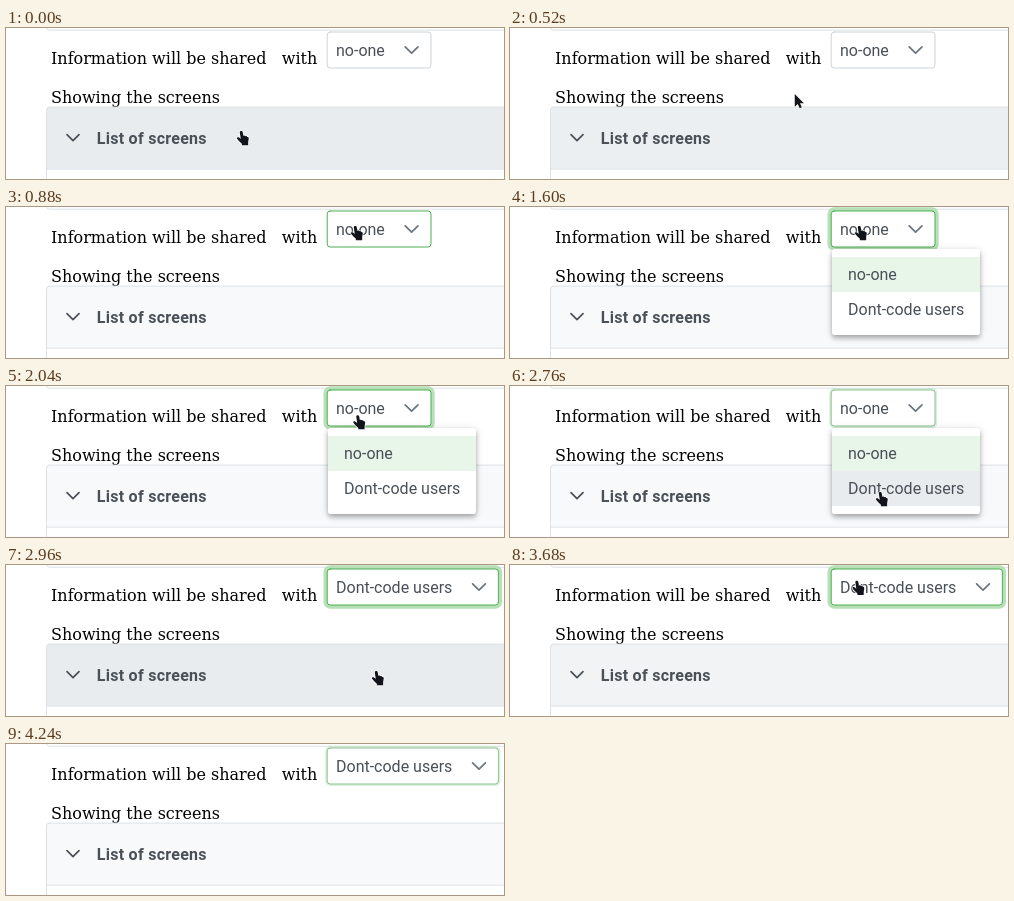
An HTML page with a canvas for the animation above (4.28 s loop, 498x151 px).

```html
<!DOCTYPE html>
<html lang="en">
<head>
<meta charset="utf-8">
<title>Sharing a list</title>
<style>
html, body { margin: 0; width: 100%; height: 100%; overflow: hidden; background: #fff; }
canvas { display: block; width: 498px; height: 151px; }
</style>
</head>
<body>
<canvas id="stage"></canvas>
<script>
const W = 498, H = 151, LOOP = 4280, STEP = 40;
const SERIF = '16px "DejaVu Serif", serif';
const SANS = '16px Roboto, sans-serif';
const BOLD = 'bold 16px Roboto, sans-serif';
const LINE = '#dee2e6', INK = '#495057';
const GREY = [206, 212, 218], GREEN = [76, 175, 80];

const canvas = document.getElementById('stage');
const ratio = window.devicePixelRatio || 1;
canvas.width = Math.round(W * ratio);
canvas.height = Math.round(H * ratio);
const ctx = canvas.getContext('2d');

const clamp = v => Math.min(1, Math.max(0, v));
const ramp = (t, from, to) => clamp((t - from) / (to - from));
const easeOut = u => 1 - (1 - u) ** 3;
const easeInOut = u => u < .5 ? 4 * u ** 3 : 1 - 4 * (1 - u) ** 3;
const lerp = (a, b, u) => a + (b - a) * u;
const mix = (a, b, u) => `rgb(${a.map((v, i) => Math.round(lerp(v, b[i], u))).join(',')})`;

function text(str, x, y, font, color, spacing = 0) {
  ctx.font = font;
  ctx.fillStyle = color;
  ctx.letterSpacing = spacing + 'px';
  ctx.fillText(str, x, y);
}

function roundRect(x, y, w, h, r) {
  ctx.beginPath();
  ctx.roundRect(x, y, w, h, r);
}

function chevron(x, y, size, color, width) {
  ctx.beginPath();
  ctx.moveTo(x - size, y - size / 2);
  ctx.lineTo(x, y + size / 2);
  ctx.lineTo(x + size, y - size / 2);
  ctx.strokeStyle = color;
  ctx.lineWidth = width;
  ctx.lineCap = ctx.lineJoin = 'round';
  ctx.stroke();
}

// Pointer moves: start, end, and the top left corner before and after
const moves = [
  [260, 800, [230, 102], [342, 19]],
  [800, 880, [342, 19], [344, 18]],
  [1880, 2400, [344, 18], [365, 105]],
  [3400, 3880, [365, 105], [332, -22]]
];

function pointerAt(t) {
  let pos = moves[0][2];
  for (const [from, to, a, b] of moves) {
    if (t < from) break;
    const u = easeInOut(ramp(t, from, to));
    pos = a.map((v, i) => lerp(v, b[i], u));
  }
  return pos;
}

const hand = new Path2D('M4 2.6C4 .8 6.8 .6 7.1 2.4L7.8 6.2C8.6 5.6 9.6 5.8 10 6.5' +
  'C10.8 6.2 11.6 6.6 11.9 7.4C13 7.3 13.5 8 13.4 9L12.8 13V16H6.2V14.6' +
  'C4.4 13 2.2 10.8 1 9C.5 7.7 2 7 3.2 8L5 9.4Z');
const arrow = new Path2D('M5 1V14.5L8.2 11.6L10.2 16L12.4 15L10.5 10.8H14.6Z');

function drawPointer(t, [x, y]) {
  const tipX = x + 5, tipY = y + 1;
  const menuOpen = t >= 1400 && t < 2880;
  const onSelect = tipX > 321 && tipY > 3 && tipY < 41;
  const shape = menuOpen || onSelect || tipY > 79 ? hand : arrow;
  ctx.save();
  ctx.translate(x, y);
  ctx.scale(.95, .95);
  ctx.lineJoin = 'round';
  ctx.lineWidth = 1.4;
  ctx.strokeStyle = '#fff';
  ctx.stroke(shape);
  ctx.fillStyle = '#12141c';
  ctx.fill(shape);
  ctx.restore();
}

function drawPage(t) {
  ctx.lineWidth = 1;
  ctx.strokeStyle = LINE;
  ctx.beginPath();
  ctx.moveTo(40.5, -2);
  ctx.arcTo(40.5, 2.2, 44, 2.2, 3);
  ctx.lineTo(W, 2.2);
  ctx.stroke();

  text('Information will be shared\u00a0\u00a0\u00a0with', 45, 36, SERIF, '#000');
  text('Showing the screens', 45, 75, SERIF, '#000');

  const hover = t < 2000 ? 1 - ramp(t, 480, 680)
    : ramp(t, 2800, 2960) - ramp(t, 3580, 3780);
  roundRect(40.5, 79.1, W, 62, [3, 0, 0, 0]);
  ctx.fillStyle = mix([248, 249, 250], [233, 236, 239], hover);
  ctx.fill();
  ctx.strokeStyle = LINE;
  ctx.stroke();
  ctx.beginPath();
  ctx.moveTo(40.5, 141);
  ctx.lineTo(40.5, H);
  ctx.stroke();
  chevron(67, 109.7, 6, INK, 1.7);
  text('List of screens', 90.7, 116, BOLD, INK, .27);
}

// Focus: gained on opening, dropped on pressing an item, regained, lost at the end
function focusAt(t) {
  if (t < 2680) return ramp(t, 1380, 1600);
  if (t < 2780) return 1 - ramp(t, 2680, 2840);
  return lerp(.4, 1, ramp(t, 2780, 2960)) - ramp(t, 4160, 4320);
}

function drawSelect(t) {
  const chosen = t >= 2800;
  const x = 321.2, y = 4, w = chosen ? 171.2 : 103.8, h = 36;
  const focus = focusAt(t);
  if (focus > 0) {
    const spread = .5 + 3.2 * focus;
    ctx.globalAlpha = focus;
    roundRect(x - spread, y - spread, w + 2 * spread, h + 2 * spread, 3 + spread);
    ctx.fillStyle = '#b7e0b8';
    ctx.fill();
    ctx.globalAlpha = 1;
  }
  const hover = ramp(t, 580, 780) - ramp(t, 2500, 2900);
  roundRect(x, y, w, h, 3);
  ctx.fillStyle = '#fff';
  ctx.fill();
  ctx.lineWidth = 1;
  ctx.strokeStyle = mix(GREY, GREEN, Math.max(hover, focus));
  ctx.stroke();
  text(chosen ? 'Dont-code users' : 'no-one', 330, 28, SANS, INK);
  chevron(x + w - 19.4, 22, 6.4, '#6c757d', 1.7);
}

function drawMenu(t, tipY) {
  const open = easeOut(ramp(t, 1380, 1500));
  const alpha = open * (1 - ramp(t, 2780, 2880));
  if (alpha <= 0) return;
  ctx.save();
  ctx.globalAlpha = alpha;
  ctx.translate(0, 42);
  ctx.scale(1, lerp(.8, 1, open));
  ctx.fillStyle = '#fff';
  for (const [dy, blur, a] of [[1, 10, .12], [4, 5, .14], [2, 4, .16]]) {
    ctx.shadowColor = `rgba(0,0,0,${a})`;
    ctx.shadowOffsetY = dy * ratio;
    ctx.shadowBlur = blur * ratio;
    roundRect(322, 0, 148, 86, 3);
    ctx.fill();
  }
  ctx.shadowColor = 'transparent';
  const selected = t >= 2800 ? 1 : 0;
  const hovered = t > 1900 && tipY >= 85 ? 1 : -1;
  ['no-one', 'Dont-code users'].forEach((label, i) => {
    const y = 8 + i * 35;
    ctx.fillStyle = i === selected ? '#e8f5e9' : i === hovered ? '#e9ecef' : '#fff';
    ctx.fillRect(322, y, 148, 35);
    text(label, 338, y + 23, SANS, INK);
  });
  ctx.restore();
}

function draw(t) {
  ctx.setTransform(ratio, 0, 0, ratio, 0, 0);
  ctx.fillStyle = '#fff';
  ctx.fillRect(0, 0, W, H);
  const pointer = pointerAt(t);
  drawPage(t);
  drawSelect(t);
  drawMenu(t, pointer[1] + 1);
  drawPointer(t, pointer);
}

const start = performance.now();
function frame() {
  const t = (performance.now() - start) % LOOP;
  draw(Math.floor(t / STEP) * STEP);
  requestAnimationFrame(frame);
}
frame();
</script>
</body>
</html>
```
